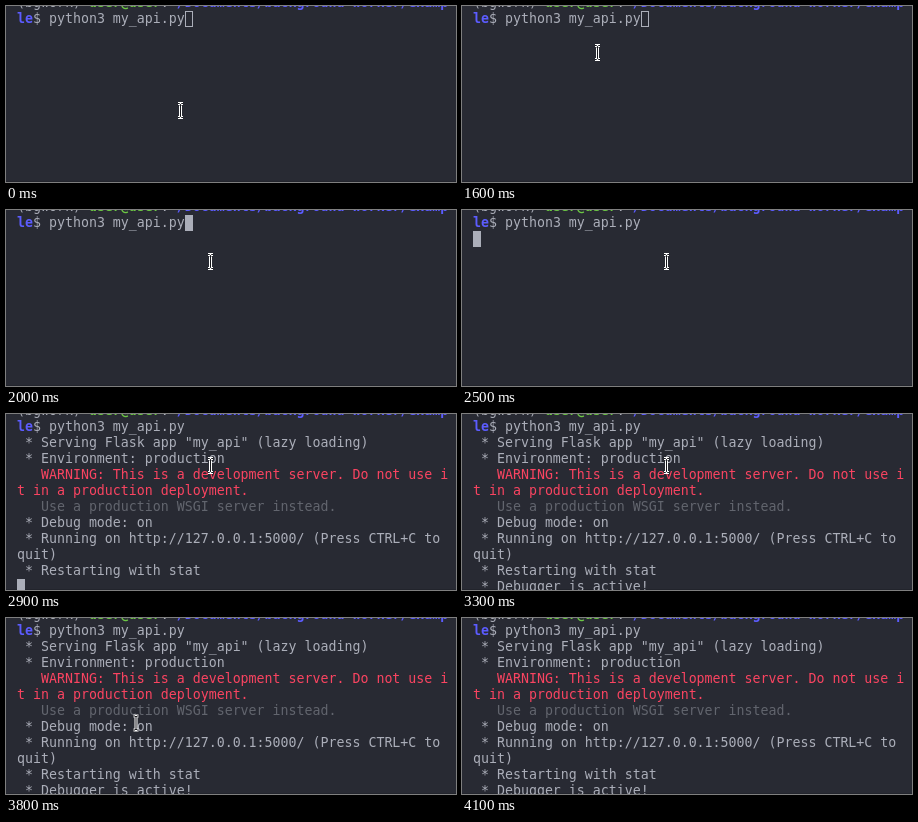
Recreate the animation shown at these times as an HTML page. Size 450 by 176 pixels, loop 4.6 s.

```html
<!DOCTYPE html>
<html lang="en">
<head>
<meta charset="utf-8">
<title>Terminal</title>
<style>
  html, body { margin: 0; width: 100%; height: 100%; overflow: hidden; background: #282a33; }
  svg { display: block; width: 450px; height: 176px; }
  text { font: 13.288px "DejaVu Sans Mono", "Liberation Mono", monospace; white-space: pre; fill: #abaeb9; }
  .user { fill: #6cc644; font-weight: bold; }
  .path { fill: #5c5cff; font-weight: bold; }
  .warn { fill: #fa4461; }
  .dim { fill: #62656e; }
</style>
</head>
<body>
<svg viewBox="0 0 450 176">
  <rect width="450" height="176" fill="#282a33"/>
  <rect y="175" width="450" height="1" fill="#22242c"/>
  <g id="lines"></g>
  <rect id="caret" width="7" height="15" stroke="#abaeb9"/>
  <g id="pointer" fill="none">
    <path d="M-2.5-7H-1L0-6L1-7H2.5M0-6V6M-2.5 7H-1L0 6L1 7H2.5" stroke="#fff" stroke-width="3"/>
    <path d="M-2.5-7H-1L0-6L1-7H2.5M0-6V6M-2.5 7H-1L0 6L1 7H2.5" stroke="#16171c"/>
  </g>
</svg>
<script>
const LOOP = 4600, LEFT = 11, CELL = 8, ROW = 16;
const NS = "http://www.w3.org/2000/svg";
const $ = id => document.getElementById(id);

// Each line: time it appears, then [text, class] runs
const script = [
  [0, ["(bgwork) "], ["user@user", "user"], [":"], ["~/Documents/background-worker/examp", "path"]],
  [0, ["le", "path"], ["$ python3 my_api.py"]],
  [2700, [' * Serving Flask app "my_api" (lazy loading)']],
  [2700, [" * Environment: production"]],
  [2700, ["   WARNING: This is a development server. Do not use i", "warn"]],
  [2700, ["t in a production deployment.", "warn"]],
  [2700, ["   Use a production WSGI server instead.", "dim"]],
  [2700, [" * Debug mode: on"]],
  [2900, [" * Running on http://127.0.0.1:5000/ (Press CTRL+C to"]],
  [2900, ["quit)"]],
  [2900, [" * Restarting with stat"]],
  [3300, [" * Debugger is active!"]]
];

// Caret: time, column, row
const carets = [[0, 21, 1], [2500, 0, 2], [2700, 0, 8], [2900, 0, 11], [3300, 0, 12]];

// Pointer: time, x, y
const moves = [
  [0, 174.5, 104.5], [1600, 135.5, 46.5], [1700, 204.5, 51.5],
  [3600, 207, 72], [3700, 185, 129], [3800, 130, 105],
  [3900, 82, 60], [4000, 40, 11.5], [4100, -20, -20]
];

const rowTop = row => row * ROW - 11;

const lines = script.map(([at, ...runs], row) => {
  const line = document.createElementNS(NS, "text");
  line.setAttribute("x", LEFT);
  line.setAttribute("y", rowTop(row) + 12);
  for (const [content, kind] of runs) {
    const run = document.createElementNS(NS, "tspan");
    run.textContent = content;
    if (kind) run.setAttribute("class", kind);
    line.append(run);
  }
  $("lines").append(line);
  return { at, line };
});

const latest = (list, t) => list.filter(item => item[0] <= t).pop();

function draw(t) {
  for (const { at, line } of lines) {
    line.setAttribute("visibility", t >= at ? "visible" : "hidden");
  }
  const [, col, row] = latest(carets, t);
  $("caret").setAttribute("x", LEFT + col * CELL + 0.5);
  $("caret").setAttribute("y", rowTop(row) + 0.5);
  $("caret").setAttribute("fill", t >= 2000 ? "#abaeb9" : "none");
  const [, x, y] = latest(moves, t);
  $("pointer").setAttribute("transform", `translate(${x} ${y})`);
}

const start = performance.now();
function tick() {
  draw((performance.now() - start) % LOOP);
  requestAnimationFrame(tick);
}
tick();
</script>
</body>
</html>
```
